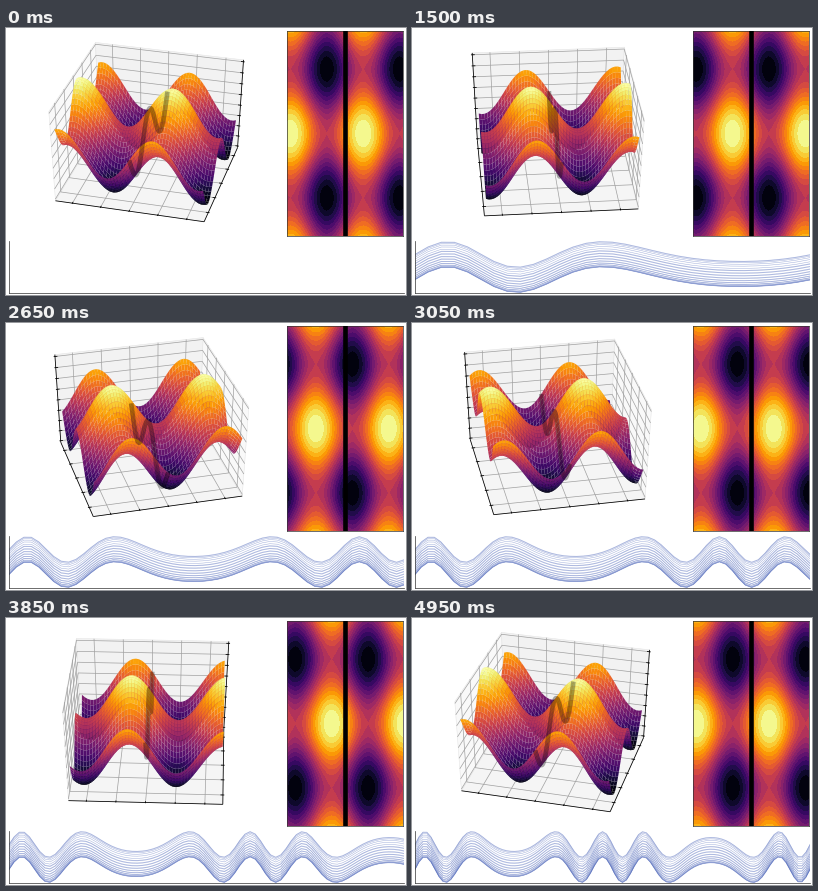
Write a matplotlib script that moves like this. It is 400x267 px and loops after 5000 ms.

```python
import numpy as np
import matplotlib.pyplot as plt
from matplotlib.animation import FuncAnimation
from matplotlib.collections import LineCollection, PolyCollection

W, H, DPI = 400, 267, 100
FRAMES, INTERVAL = 100, 50
PX = 72 / DPI                      # points per pixel
ELEV = np.radians(40)
HALF = 0.5 + 1 / 48                # half size of the drawn box
CENTER, SCALE = (143, 102.7), (147.4, 110.8)

times = np.linspace(0, 2 * np.pi, FRAMES)
phases = 10 * np.sin(times)
turns = np.radians(15) * np.cos(times)

fig = plt.figure(figsize=(W / DPI, H / DPI), dpi=DPI, facecolor="white")


def add_axes(left, top, width, height):
    ax = fig.add_axes([left / W, 1 - (top + height) / H, width / W, height / H])
    ax.set_xticks([])
    ax.set_yticks([])
    for spine in ax.spines.values():
        spine.set_linewidth(0.7 * PX)
        spine.set_color("#333333")
    return ax


def project(x, y, z, turn):
    """Perspective view of the unit box: pixel x, pixel y, nearness."""
    side = x * np.cos(turn) + y * np.sin(turn)
    front = x * np.sin(turn) - y * np.cos(turn)
    up = z * np.cos(ELEV) - front * np.sin(ELEV)
    near = front * np.cos(ELEV) + z * np.sin(ELEV)
    zoom = 10 / (10 - near)
    return CENTER[0] + SCALE[0] * side * zoom, CENTER[1] - SCALE[1] * up * zoom, near


def path(points, turn):
    x, y, _ = project(*np.array(points, float).T, turn)
    return np.column_stack([x, y])


def height(x, y, phase):
    return np.sin(x + phase) + np.cos(y)


# Surface view
view = add_axes(0, 0, W, H)
view.axis("off")
view.set_xlim(0, W)
view.set_ylim(H, 0)

panes = PolyCollection([], facecolors=["#f9f9f9", "#f2f2f2", "#f5f5f5"],
                       edgecolors="#e4e4e4", linewidths=0.5 * PX, zorder=1)
grid = LineCollection([], colors="#a0a0a0", linewidths=0.7 * PX, zorder=2)
edges = LineCollection([], colors="black", linewidths=0.8 * PX, zorder=3)
surface = PolyCollection([], cmap="inferno", edgecolors="none", zorder=4)
surface.set_clim(-2, 2)
for part in (panes, grid, edges, surface):
    view.add_collection(part, autolim=False)
ridge, = view.plot([], [], color="black", alpha=0.33, lw=4.6 * PX,
                   solid_capstyle="butt", zorder=5)

# Contour view
flat = add_axes(281, 3, 116, 205)
flat.set_xlim(-5, 5)
flat.set_ylim(-5, 5)
flat.axvline(0, color="black", lw=4.6 * PX, zorder=3)
fine = np.linspace(-5, 5, 100)
fine_x, fine_y = np.meshgrid(fine, fine)
levels = np.linspace(-2, 2, 21)
bands = []

# History of the slice at x = 0
trace = add_axes(3, 213, 395, 52)
trace.spines[["top", "right"]].set_visible(False)
trace.set_ylim(-2.03, 2.03)
cut = np.linspace(-5, 5, 50)
history = [trace.plot([], [], color="#3350b0", alpha=0.45, lw=0.5 * PX)[0]
           for _ in cut[25:]]

mesh_x, mesh_y = np.meshgrid(cut, cut)
slice_y = np.linspace(-5, 5, 120)


def draw_box(turn):
    h = HALF
    near = h if turn > 0 else -h       # side holding the y and z axes
    far = -near
    panes.set_verts([path(p, turn) for p in (
        [(far, -h, -h), (far, h, -h), (far, h, h), (far, -h, h)],
        [(-h, h, -h), (h, h, -h), (h, h, h), (-h, h, h)],
        [(-h, -h, -h), (h, -h, -h), (h, h, -h), (-h, h, -h)])])

    lines = []
    ticks = [[(-h, -h, -h), (h, -h, -h)],
             [(near, -h, -h), (near, h, -h)],
             [(near, h, -h), (near, h, h)]]
    tick_out, tick_in = 1 / 110, 1 / 60
    sign = np.sign(near)
    outer, inner = near + sign * tick_out, near - sign * tick_in
    for v in np.arange(-4, 5, 2) / 10:
        lines.append([(v, -h, -h), (v, h, -h), (v, h, h)])
        lines.append([(near, v, -h), (far, v, -h), (far, v, h)])
        ticks.append([(v, -h - tick_out, -h), (v, -h + tick_in, -h)])
        ticks.append([(outer, v, -h), (inner, v, -h)])
    for v in np.linspace(-0.5, 0.5, 9):
        lines.append([(near, h, v), (far, h, v), (far, -h, v)])
        ticks.append([(outer, h, v), (inner, h, v)])
    grid.set_segments([path(p, turn) for p in lines])
    edges.set_segments([path(p, turn) for p in ticks])


def corners(a):
    return np.stack([a[:-1, :-1], a[:-1, 1:], a[1:, 1:], a[1:, :-1]], axis=-1)


def draw_surface(phase, turn):
    z = height(mesh_x, mesh_y, phase)
    px, py, near = project(mesh_x / 10, mesh_y / 10, z / 4, turn)
    quads = np.stack([corners(px), corners(py)], axis=-1).reshape(-1, 4, 2)
    order = np.argsort(corners(near).mean(axis=-1).ravel())
    surface.set_verts(quads[order])
    surface.set_array(corners(z).mean(axis=-1).ravel()[order])
    rx, ry, _ = project(0 * slice_y, slice_y / 10,
                        height(0, slice_y, phase) / 4, turn)
    ridge.set_data(rx, ry)


def draw_contours(phase):
    while bands:
        bands.pop().remove()
    z = np.clip(height(fine_x, fine_y, phase), -2, 2)
    bands.append(flat.contourf(fine_x, fine_y, z, levels=levels,
                               cmap="inferno", zorder=1))


def draw_history(i):
    steps = np.arange(i + 1)
    trace.set_xlim(0, max(i, 1))
    for line, y in zip(history, cut[25:]):
        line.set_data(steps, height(0, y, phases[:i + 1]))


def update(i):
    draw_box(turns[i])
    draw_surface(phases[i], turns[i])
    draw_contours(phases[i])
    draw_history(i)
    return []


anim = FuncAnimation(fig, update, frames=FRAMES, interval=INTERVAL,
                     init_func=lambda: update(0), repeat=True, repeat_delay=0)
plt.show()
```
